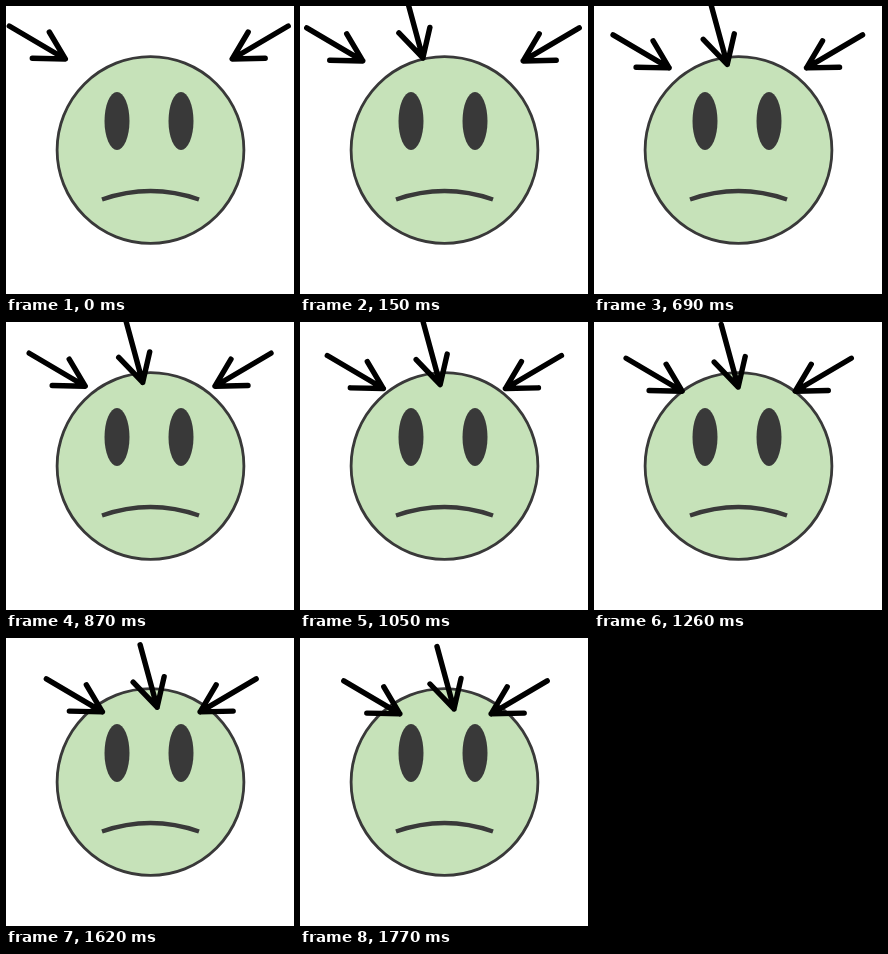
An HTML page that plays this animation: 288x288 px, repeating every 1.8 s.

```html
<!DOCTYPE html>
<html lang="en">
<head>
<meta charset="utf-8">
<title>Arrows closing in on a sad face</title>
<style>
  html, body { margin: 0; width: 100%; height: 100%; overflow: hidden; background: #fff; }
  svg { display: block; width: 100%; height: 100%; }
  .arrow { fill: none; stroke: #000; stroke-width: 5.4; stroke-linecap: round; stroke-linejoin: round; }
</style>
</head>
<body>
<svg viewBox="0 0 288 288">
  <g fill="#393939" stroke="#393939">
    <circle cx="144.5" cy="144" r="93.4" fill="#c6e2b9" stroke-width="2.8"/>
    <ellipse cx="111" cy="115" rx="12.5" ry="29" stroke="none"/>
    <ellipse cx="175" cy="115" rx="12.5" ry="29" stroke="none"/>
    <path d="M96 193.5Q144.500 176.500 193 193.500" fill="none" stroke-width="4.4"/>
  </g>
  <!-- each path has its tip at the origin -->
  <path class="arrow" d="M-56 -33L0 0M-16 -27L0 0L-33 -.7"/>
  <path class="arrow" d="M56 -33L0 0M16 -27L0 0L33 -.7"/>
  <path class="arrow" d="M-17 -62.500L0 0M-24 -25L0 0L7 -30.500"/>
</svg>
<script>
const LOOP = 1800, STEP = 30, LAST = LOOP - STEP;
const arrows = document.querySelectorAll('.arrow');
// start x, start y, travel x, travel y
const paths = [
  [59.3, 53, 40.5, 22.8],
  [226.2, 53, -35, 22.8],
  [120, 50.2, 34, 20.8]
];

function draw(now) {
  const time = Math.floor(now % LOOP / STEP) * STEP;
  const p = time / LAST;
  paths.forEach(([x, y, dx, dy], i) =>
    arrows[i].setAttribute('transform', `translate(${x + dx * p} ${y + dy * p})`));
  // the middle arrow is missing for the first step
  arrows[2].style.display = time < STEP ? 'none' : '';
  requestAnimationFrame(draw);
}

draw(0);
</script>
</body>
</html>
```
